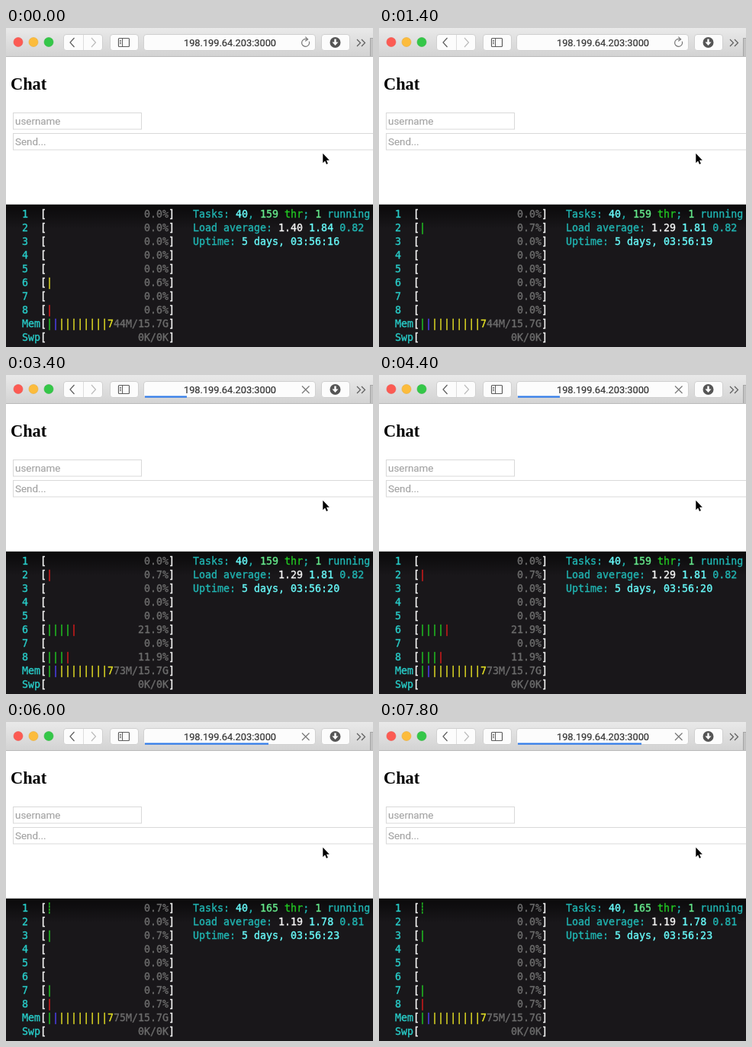
Recreate the animation shown at these times as an HTML page. Size 481 by 419 pixels, loop 8 s.

```html
<!DOCTYPE html>
<html lang="en">
<head>
<meta charset="utf-8">
<title>Chat and system monitor</title>
<style>
html, body { margin: 0; width: 100%; height: 100%; overflow: hidden; background: #fff; }
svg { display: block; }
.ui { font-family: Roboto, "Liberation Sans", sans-serif; }
.button { fill: #fcfcfc; stroke: #d0d0d0; }
.icon { fill: none; stroke: #5c5c5c; stroke-width: 1.2; }
.input { fill: #fff; stroke: #d9d9d9; }
.hint { fill: #a3a3a3; font-size: 13.4px; stroke: #a3a3a3; stroke-width: .15; }
#term { font: 13.3px "DejaVu Sans Mono", monospace; stroke-width: .35; }
#term text { white-space: pre; }
</style>
</head>
<body>
<svg width="481" height="419" viewBox="0 0 481 419">
  <defs>
    <linearGradient id="chrome" x2="0" y2="1">
      <stop stop-color="#e9e9e9"/><stop offset="1" stop-color="#d3d3d3"/>
    </linearGradient>
    <linearGradient id="shade" x2="0" y2="1">
      <stop stop-color="#000" stop-opacity=".6"/><stop offset="1" stop-color="#000" stop-opacity="0"/>
    </linearGradient>
  </defs>
  <rect width="481" height="419" fill="#fff"/>

  <!-- toolbar -->
  <rect width="481" height="37" fill="url(#chrome)"/>
  <rect y="37" width="481" height="1" fill="#b9b9b9"/>
  <g stroke-width=".6">
    <circle cx="16" cy="18.5" r="6" fill="#fc5b53" stroke="#ec554d"/>
    <circle cx="36" cy="18.5" r="6" fill="#fcbc3c" stroke="#e9ad38"/>
    <circle cx="56" cy="18.5" r="6" fill="#34c748" stroke="#2fb840"/>
  </g>
  <g class="button">
    <rect x="75.5" y="8.5" width="51" height="21" rx="3.5"/>
    <path d="M101.5 9v20" stroke="#ddd"/>
    <rect x="136.5" y="8.5" width="37" height="21" rx="3.5"/>
    <rect x="180.5" y="8.5" width="225" height="21" rx="3.5"/>
    <rect x="413.5" y="8.5" width="37" height="21" rx="3.5"/>
  </g>
  <g class="icon">
    <path d="M89.5 13l-5.5 6 5.5 6"/>
    <path d="M112 13l5.5 6-5.5 6" stroke="#bbb" style="stroke:#bbb"/>
    <rect x="147.5" y="13.5" width="14" height="11" rx="1"/>
    <path d="M152.5 14v10M149 16.5h2M149 18.5h2M149 20.5h2" stroke-width="1"/>
    <path d="M460 15l4.5 4.5-4.5 4.5M466 15l4.5 4.5-4.5 4.5"/>
  </g>
  <circle cx="431.5" cy="19" r="7" fill="#555"/>
  <path d="M430.3 14.5h2.4v4h2.8l-4 4.5-4-4.5h2.8z" fill="#fff"/>
  <path d="M477 13h4v24h-4z" fill="#c2c2c2"/>
  <path d="M477.5 13v24M477 13.5h4" stroke="#a5a5a5"/>
  <text class="ui" x="293.5" y="24" text-anchor="middle" font-size="12.8" fill="#333" stroke="#333" stroke-width=".2">198.199.64.203:3000</text>
  <g class="icon" style="stroke:#777">
    <g id="reload">
      <path d="M397.3 17.6a5 5 0 1 1-2.6-2.8"/>
      <path d="M392.4 11.6l3.2 3.2-3.4 2.4"/>
    </g>
    <path id="stop" d="M388 14.5l9.5 9.5M397.5 14.5l-9.5 9.5"/>
  </g>
  <rect id="bar" x="182" y="27.5" height="2.2" fill="#2f7bea"/>

  <!-- page -->
  <text x="6" y="80.5" font-family="'Liberation Serif', serif" font-weight="bold" font-size="22.4">Chat</text>
  <rect class="input" x="9.5" y="111.5" width="168" height="21.5"/>
  <rect class="input" x="9.5" y="138.5" width="500" height="21.5"/>
  <g class="ui hint">
    <text x="12" y="127">username</text>
    <text x="12" y="154">Send...</text>
  </g>
  <path d="M415.3 164.8v12.4l2.8-2.6 1.9 4.3 1.9-.8-1.9-4.3h3.8z" stroke="#fff" stroke-width="1.2" paint-order="stroke"/>

  <!-- terminal -->
  <rect y="231" width="481" height="1" fill="#d0d0d0"/>
  <rect y="232" width="481" height="187" fill="#19171a"/>
  <rect y="232" width="481" height="32" fill="url(#shade)"/>
  <g id="term"></g>
</svg>
<script>
const LOOP = 8000;
const $ = id => document.getElementById(id);
const color = {
  c: '#20b5b2', C: '#68fafa', l: '#28ccc8', g: '#22c622', G: '#66ea8c', r: '#d81c1c', b: '#4f40f4',
  y: '#e4e024', w: '#f4f4f4', d: '#6c6c6c'
};

// Meter bars: one colour letter per bar, D is a dotted green one.
const samples = [
  { at: 0, sec: 16, thr: 159, load: ['1.40', '1.84', '0.82'], mem: '44M', cpu: { 6: ['y', '0.6'], 8: ['r', '0.6'] } },
  { at: 200, sec: 17, thr: 159, load: ['1.29', '1.81', '0.82'], mem: '44M', cpu: {} },
  { at: 1400, sec: 19, thr: 159, load: ['1.29', '1.81', '0.82'], mem: '44M', cpu: { 2: ['g', '0.7'] } },
  { at: 2600, sec: 20, thr: 159, load: ['1.29', '1.81', '0.82'], mem: '73M',
    cpu: { 2: ['r', '0.7'], 6: ['ggggr', '21.9'], 8: ['gggr', '11.9'] } },
  { at: 4800, sec: 22, thr: 165, load: ['1.19', '1.78', '0.81'], mem: '75M',
    cpu: { 1: ['Dr', '1.3'], 2: ['g', '0.7'], 3: ['g', '0.7'], 8: ['gry', '3.3'] } },
  { at: 6000, sec: 23, thr: 165, load: ['1.19', '1.78', '0.81'], mem: '75M',
    cpu: { 1: ['D', '0.7'], 3: ['g', '0.7'], 7: ['g', '0.7'], 8: ['r', '0.7'] } }
];

// Page loading: time, bar width, whether the stop icon shows.
const loading = [
  [0, 0, 0], [1600, 55, 0], [2000, 55, 1], [6000, 162, 1], [6200, 222, 1],
  [6400, 0, 0], [7200, 55, 0], [7600, 150, 1], [7800, 162, 1]
];

const latest = (list, t, time) => list.filter(item => time(item) <= t).pop();

function line(row, col, ...runs) {
  const spans = runs.map(([c, s]) => `<tspan fill="${color[c]}" stroke="${color[c]}">${s}</tspan>`);
  return `<text x="${21 + col * 8}" y="${249 + row * 18}">${spans.join('')}</text>`;
}

function meter(row, label, bars, value) {
  const runs = [...bars].map(b => b === 'D' ? ['g', '┊'] : [b, '|']);
  return line(row, 0, ['l', label.padEnd(3)], ['w', '['], ...runs) +
    line(row, 24 - value.length, ['d', value], ['w', ']']);
}

function terminal(s) {
  let out = '';
  for (let n = 1; n <= 8; n++) {
    const [bars, load] = s.cpu[n] || ['', '0.0'];
    out += meter(n - 1, String(n), bars, load + '%');
  }
  out += meter(8, 'Mem', 'gbyyyyyyyy', s.mem + '/15.7G') + line(8, 14, ['y', '7']);
  out += meter(9, 'Swp', '', '0K/0K');
  out += line(0, 28, ['c', 'Tasks: '], ['C', '40'], ['c', ', '], ['G', s.thr], ['g', ' thr'],
    ['c', '; '], ['G', '1'], ['c', ' running']);
  out += line(1, 28, ['c', 'Load average: '], ['w', s.load[0] + ' '], ['C', s.load[1] + ' '], ['c', s.load[2]]);
  return out + line(2, 28, ['c', 'Uptime: '], ['C', '5 days, 03:56:' + s.sec]);
}

let shown;
function draw(now) {
  const t = now % LOOP;
  const sample = latest(samples, t, s => s.at);
  if (sample !== shown) {
    shown = sample;
    $('term').innerHTML = terminal(sample);
  }
  const [, width, busy] = latest(loading, t, l => l[0]);
  $('bar').setAttribute('width', width);
  $('stop').style.display = busy ? '' : 'none';
  $('reload').style.display = busy ? 'none' : '';
}

const start = performance.now();
function tick() {
  draw(performance.now() - start);
  requestAnimationFrame(tick);
}
tick();
</script>
</body>
</html>
```
